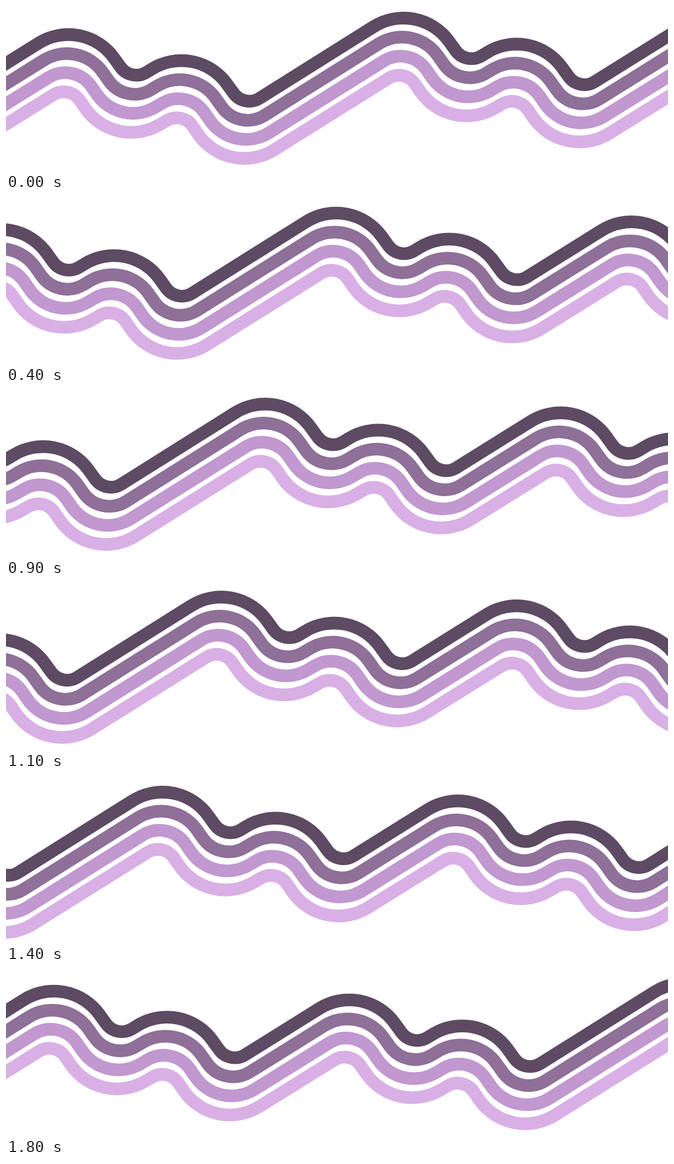
These frames come from a looping animation (1280 by 320 pixels, 1910 ms). An HTML page:

```html
<!DOCTYPE html>
<html lang="en">
<head>
<meta charset="utf-8">
<title>Rolling stripes</title>
<style>
html, body { margin: 0; width: 100%; height: 100%; overflow: hidden; background: #fff; }
svg { display: block; width: 100%; height: 100%; }
</style>
</head>
<body>
<svg viewBox="0 0 1280 320"><g id="sheet" fill="none" stroke-width="24.6"></g></svg>
<script>
const COLORS = ['#5d4a63', '#8e7098', '#c198cf', '#d9b0e5'];
const LOOP = 1910, STEP = 100, LAST = 18;
const R_BIG = 108.2, R_SMALL = 37.5, GAP = 37;

// Tops of the large humps; each is followed by a dip, a small hump and a deep dip.
const HUMPS = [[-450.4, 38.4], [120.6, 55.4], [768.6, 23.4], [1339.6, 40.4], [1987.6, 8.4]];

// Sheet position: time in ms, x, y
const KEYS = [
  [0, 0, 0], [200, -77, 7.7], [600, -183.5, 0], [900, -267.5, 0],
  [1300, -437.5, 0], [1400, -466, 4], [1600, -568.3, 7.7], [1800, -676, 15.6]
];

function circles(k) {
  const dr = k * (R_BIG - R_SMALL) / 3;
  const hump = (x, y) => {
    const r = R_BIG - dr;
    return { x: x - 3 * k, y: y + GAP * k + r, r, side: 1 };
  };
  const dip = (x, y) => {
    const r = R_SMALL + dr;
    return { x: x - 3.2 * k, y: y + GAP * k - r, r, side: -1 };
  };
  return HUMPS.flatMap(([x, y]) => [
    hump(x, y), dip(x + 131.3, y + 78.7),
    hump(x + 218.5, y + 50.5), dip(x + 349.8, y + 129.2)
  ]);
}

// Direction of the line that leaves circle a and crosses over to circle b
function tangent(a, b) {
  const dx = b.x - a.x, dy = b.y - a.y;
  const ratio = Math.min(1, (a.r + b.r) / Math.hypot(dx, dy));
  return Math.atan2(dy, dx) + a.side * Math.asin(ratio);
}

function touch(c, angle) {
  const r = c.r * c.side;
  return (c.x + r * Math.sin(angle)).toFixed(2) + ' ' + (c.y - r * Math.cos(angle)).toFixed(2);
}

function ribbon(k) {
  const list = circles(k);
  let angle = -0.56, d = 'M' + touch(list[0], angle);
  list.forEach((c, i) => {
    const next = list[i + 1];
    angle = next ? tangent(c, next) : -0.56;
    d += `A${c.r} ${c.r} 0 0 ${c.side > 0 ? 1 : 0} ${touch(c, angle)}`;
    if (next) d += 'L' + touch(next, angle);
  });
  return d;
}

function place(t) {
  const i = Math.max(1, KEYS.findIndex(key => key[0] >= t));
  const [t0, x0, y0] = KEYS[i - 1], [t1, x1, y1] = KEYS[i];
  const p = (t - t0) / (t1 - t0);
  return [x0 + (x1 - x0) * p, y0 + (y1 - y0) * p];
}

const sheet = document.getElementById('sheet');
COLORS.forEach((color, k) => {
  const path = document.createElementNS('http://www.w3.org/2000/svg', 'path');
  path.setAttribute('d', ribbon(k));
  path.setAttribute('stroke', color);
  sheet.append(path);
});

const start = performance.now();

function draw(now) {
  const t = Math.max(0, now - start) % LOOP;
  const [x, y] = place(Math.min(LAST, Math.floor(t / STEP)) * STEP);
  sheet.setAttribute('transform', `translate(${x.toFixed(2)} ${y.toFixed(2)})`);
  requestAnimationFrame(draw);
}
draw(start);
</script>
</body>
</html>
```
